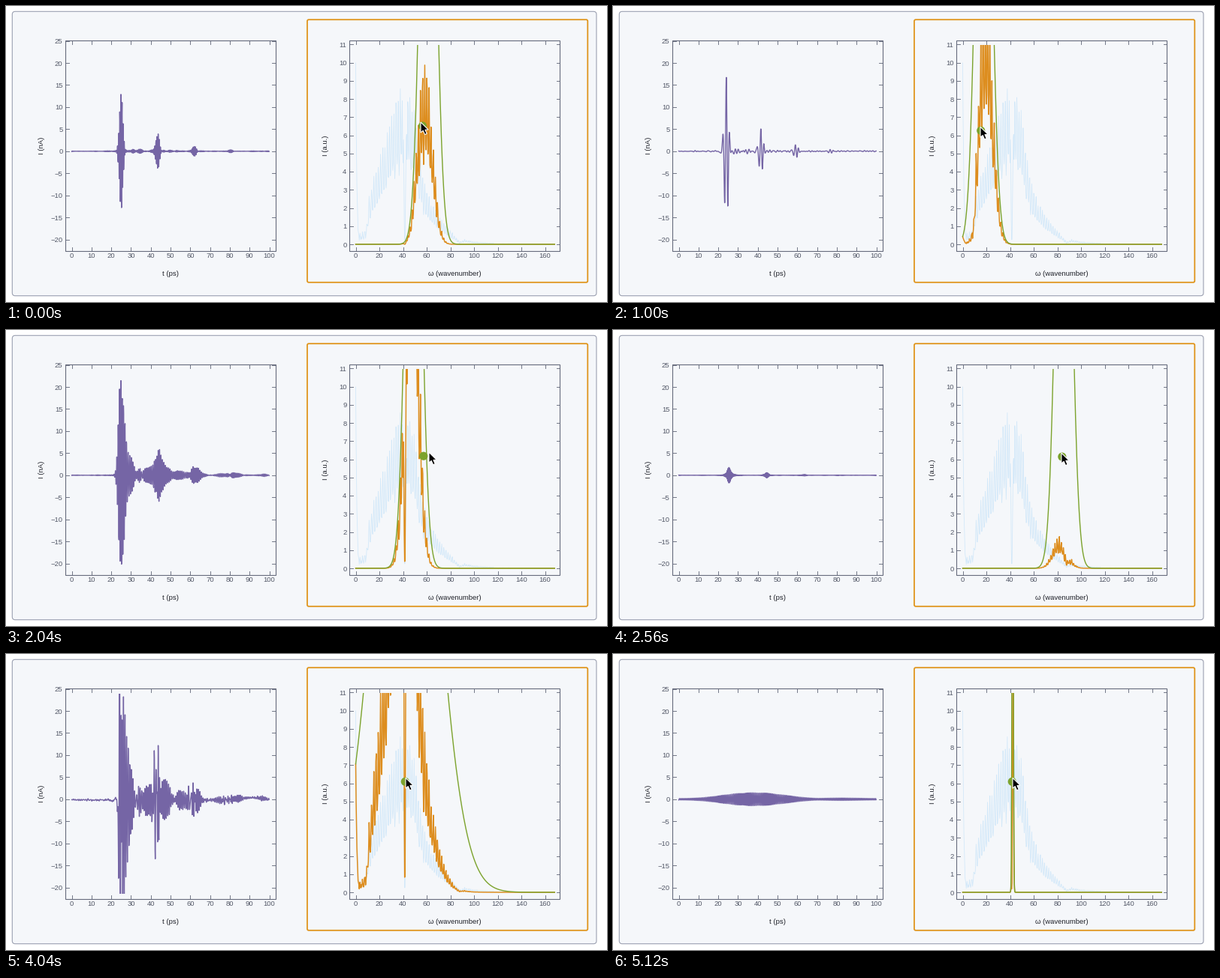
These frames come from a looping animation (800x395 px, 5.16 s). A matplotlib script:

```python
import numpy as np
import matplotlib.pyplot as plt
from matplotlib.animation import FuncAnimation
from matplotlib.patches import Circle, FancyBboxPatch, Polygon, Rectangle

W, H, DPI = 800, 395, 100
STEP, FRAMES = 40, 129
PX = 72 / DPI

FRAME, TICK, INK = "#666b7c", "#555a69", "#20222a"
PURPLE, ORANGE, GREEN, BLUE = "#7565a5", "#dd8d1e", "#7ca32d", "#d2e8f9"

# ---------- signal model: echo train through an absorbing slab ----------
N, SPAN = 1008, 100.0
RAD = 0.1884                # rad/ps per wavenumber
GAIN, PEAK = 0.0407, 33.2
t_ps = np.arange(N) * SPAN / N
wn = np.arange(N // 2 + 1) * 33.356 / SPAN

ENVELOPE = np.array([
    (0, .1), (4, .3), (9, .6), (11, 1.7), (15, 2.6), (20, 3.3), (25, 4.1),
    (30, 5), (35, 5.9), (39, 6.4), (44, 6.4), (48, 5.7), (51, 4.7),
    (54, 3.5), (59, 2.2), (63, 1.75), (70, 1.1), (78, .62), (84, .3),
    (88, .08), (92, .17), (100, .1), (120, .02), (170, 0)])


def line(w, w0, strength, width):
    return np.exp(-strength / (width + 1j * RAD * (w - w0)))


def measured_spectrum():
    rng = np.random.default_rng(4)
    m = 8 * N
    w = np.arange(m // 2 + 1) * 33.356 / (8 * SPAN)
    slab = line(w, 41.5, 0.448, 0.025)
    chirp = 0.012 * w ** 2
    delay = RAD * (23.57 * w + chirp) + 0.73
    trip = RAD * (16.97 * w + chirp) + 0.73
    field = np.interp(w, *ENVELOPE.T) * slab * np.exp(-1j * delay)
    field /= 1 - 0.31 * slab ** 2 * np.exp(-1j * trip)
    for w0 in (18.6, 25.1, 32.9, 36.6, 47.1, 53.4, 57.3, 64.0):
        field *= line(w, w0, 0.012, 0.05)
    spec = np.fft.rfft(np.fft.irfft(field, m)[:N])
    noise = rng.normal(size=(2, wn.size)) * 0.12 * np.exp(-wn / 45)
    drift = 10 * np.exp(-wn / 0.9) * np.exp(2j * np.pi * rng.random(wn.size))
    drift[0] = -10
    return spec + noise[0] + 1j * noise[1] + drift


SPEC = measured_spectrum()


# ---------- motion ----------
def glide(keys):
    """Smooth monotone interpolation through (time, value) keys."""
    x, y = np.array(keys, float).T
    d = np.diff(y) / np.diff(x)
    m = np.zeros_like(y)
    m[0], m[-1] = d[0], d[-1]
    for i in range(1, len(d)):
        if d[i - 1] * d[i] > 0:
            m[i] = 2 * d[i - 1] * d[i] / (d[i - 1] + d[i])

    def at(t):
        t = min(max(t, x[0]), x[-1])
        i = min(np.searchsorted(x, t, side="right") - 1, len(d) - 1)
        h = x[i + 1] - x[i]
        u = (t - x[i]) / h
        return (y[i] * (1 + 2 * u) * (1 - u) ** 2 + m[i] * h * u * (1 - u) ** 2
                + y[i + 1] * u * u * (3 - 2 * u) + m[i + 1] * h * u * u * (u - 1))
    return at


mouse_x = glide([(-120, 564), (0, 552), (400, 524.3), (1000, 489), (1350, 479),
                 (1940, 542.5), (2040, 563), (2450, 600), (3020, 551.5),
                 (3120, 541), (3350, 532), (5160, 532)])
mouse_y = glide([(-120, 154), (0, 155), (400, 158), (1000, 161.3), (2040, 163.2),
                 (3120, 165), (3350, 165.3), (5160, 165.3)])
log_width = glide([(0, np.log(6)), (3440, np.log(6)), (4040, np.log(24)),
                   (4260, np.log(27)), (4800, np.log(2.2)), (5120, np.log(.5)),
                   (5160, np.log(.5))])


# ---------- stage ----------
fig = plt.figure(figsize=(W / DPI, H / DPI), dpi=DPI, facecolor="white")
ax = fig.add_axes([0, 0, 1, 1])
ax.set_xlim(0, W)
ax.set_ylim(H, 0)
ax.axis("off")


def panel(x0, y0, x1, y1, r, **style):
    box = FancyBboxPatch((x0, y0), x1 - x0, y1 - y0,
                         boxstyle=f"round,pad=0,rounding_size={r}", **style)
    ax.add_patch(box)


def text(x, y, s, color=TICK, size=9.5, **kw):
    kw = {"ha": "center", "va": "center_baseline", **kw}
    ax.text(x, y, s, color=color, fontsize=size * PX,
            family=["Liberation Sans", "DejaVu Sans"], **kw)


def segment(x, y):
    ax.plot(x, y, color=FRAME, lw=0.9 * PX, zorder=2)


def plot_frame(x0, x1, xs, ys, to_x, to_y, x_label, y_label):
    top, bottom = 46, 326.5
    ax.add_patch(Rectangle((x0, top), x1 - x0, bottom - top, fill=False,
                           ec=FRAME, lw=1.1 * PX, zorder=2))
    for v in xs:
        x = to_x(v)
        segment([x, x], [bottom, bottom - 4.5])
        segment([x, x], [top, top + 4.5])
        text(x, 333, str(v))
    for v in ys:
        y = to_y(v)
        segment([x0, x0 + 4.5], [y, y])
        segment([x1, x1 - 4.5], [y, y])
        text(x0 - 3.5, y, str(v).replace("-", "\u2212"), ha="right")
    text((x0 + x1) / 2, 356.5, x_label, INK)
    text(x0 - 31.5, 186, y_label, INK, rotation=90, va="center")


def curve(color, width, clip, z):
    ln, = ax.plot([], [], color=color, lw=width * PX, zorder=z,
                  solid_joinstyle="round")
    x0, y0, x1, y1 = clip
    ln.set_clip_path(Rectangle((x0, y0), x1 - x0, y1 - y0, transform=ax.transData))
    return ln


def left_x(t):
    return 87.5 + 2.63 * t


def left_y(v):
    return 193.8 - 5.89 * v


def right_x(w):
    return 465.5 + 1.575 * w


def right_y(v):
    return 318 - 24.25 * v


panel(8.3, 7.3, 786, 386.7, 4, fc="#f5f7fa", ec="#9a9fb0", lw=1.1 * PX, zorder=0)
panel(401, 18.2, 774.3, 368.8, 2, fc="none", ec="#e0951c", lw=1.8 * PX, zorder=1)
plot_frame(79, 358.7, range(0, 101, 10), range(-20, 26, 5), left_x, left_y,
           "t (ps)", "I (nA)")
plot_frame(457, 737, range(0, 161, 20), range(12), right_x, right_y,
           "\u03c9 (wavenumber)", "I (a.u.)")

right_clip = (457, 52, 737, 326)
trace = curve(PURPLE, 1.4, (79, 52.5, 358, 320), 3)
raw = curve(BLUE, 0.8, right_clip, 3)
filtered = curve(ORANGE, 1.5, right_clip, 4)
window = curve(GREEN, 1.4, right_clip, 5)
raw.set_data(right_x(wn), right_y(abs(SPEC)))

knob = Circle((0, 0), 5.6, fc=GREEN, ec="none", zorder=6)
ax.add_patch(knob)
ARROW = np.array([(0, 0), (0, 14), (3.2, 11.2), (5.6, 16.6), (8.2, 15.4),
                  (5.9, 10.2), (10.2, 10.1)])
arrow = Polygon(ARROW, fc="black", ec="white", lw=1.1 * PX, zorder=7)
ax.add_patch(arrow)


def draw(i):
    t = i * STEP
    # the curves trail the pointer slightly
    center = (mouse_x(t - 100) - 465.5) / 1.575
    width = np.exp(log_width(t))
    gauss = PEAK * np.exp(-((wn - center) / width) ** 2 / 2)
    out = SPEC * gauss / 10
    trace.set_data(left_x(t_ps), left_y(np.fft.irfft(out, N) * N * GAIN / 2))
    filtered.set_data(right_x(wn), right_y(abs(out)))
    window.set_data(right_x(wn), right_y(gauss))
    knob.center = (mouse_x(t - 35) - 0.7, mouse_y(t) + 5)
    arrow.set_xy(ARROW + (mouse_x(t), mouse_y(t)))
    return trace, filtered, window, knob, arrow


anim = FuncAnimation(fig, draw, frames=FRAMES, interval=STEP, repeat=True,
                     repeat_delay=0, blit=False)
plt.show()
```
